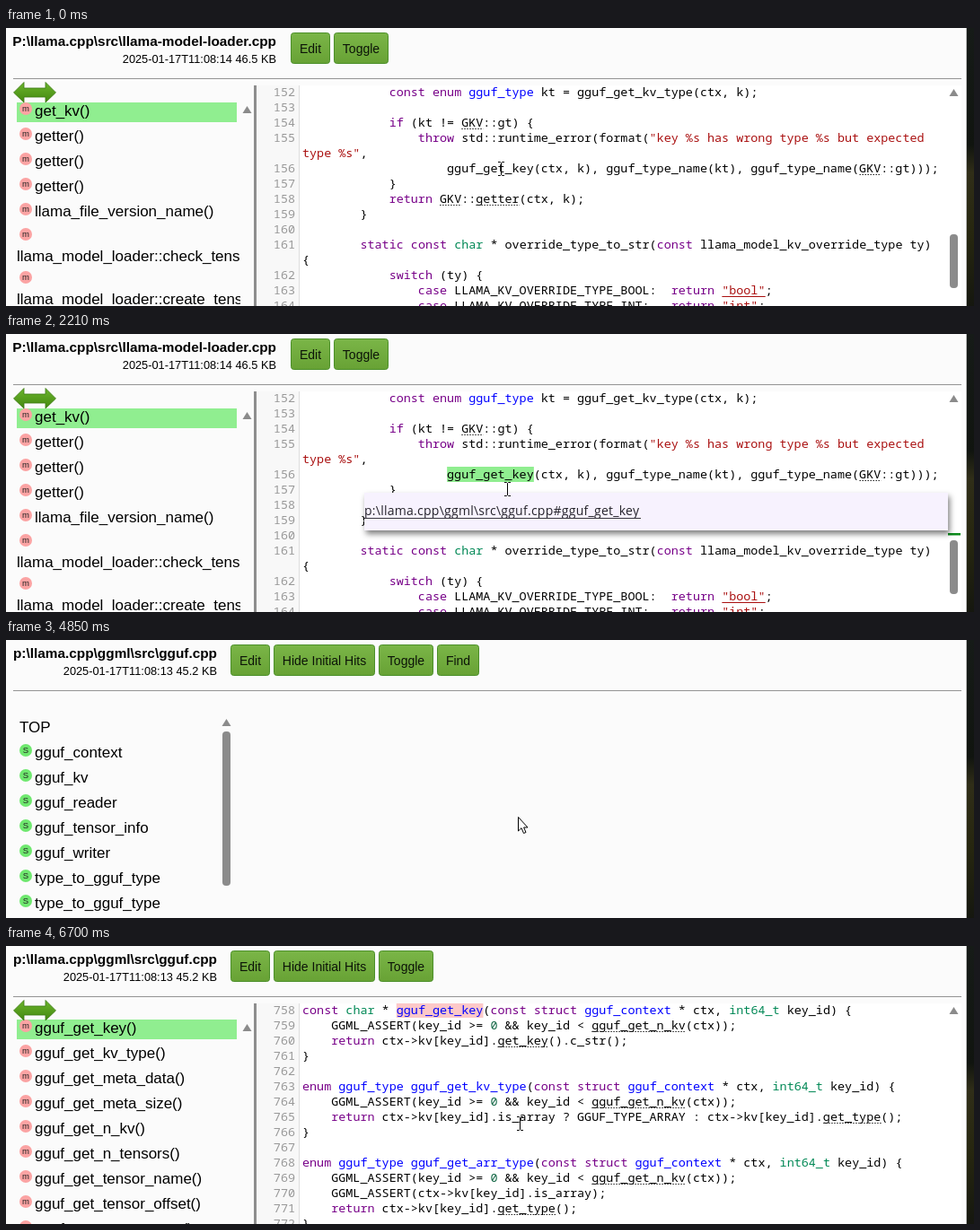
An HTML page that plays this animation: 1078x310 px, repeating every 8 s.

```html
<!DOCTYPE html>
<html lang="en">
<head>
<meta charset="utf-8">
<title>Source browser</title>
<style>
  html, body { margin: 0; width: 100%; height: 100%; overflow: hidden; background: #fbfbfb; }
  svg { display: block; }
  text { white-space: pre; font-family: "Liberation Sans", Arial, sans-serif; }
  .title { font-size: 15.36px; font-weight: bold; text-anchor: end; }
  .date { font-size: 12.8px; text-anchor: end; }
  .button { font-size: 14px; text-anchor: middle; fill: #0c1408; }
  .item { font-size: 17px; }
  .badge { font-size: 9.5px; text-anchor: middle; fill: #222; }
  .code, .num { font-family: "Noto Sans Mono", "DejaVu Sans Mono", monospace; font-size: 13.43px; }
  .num { fill: #999; text-anchor: end; }
  .link { font-family: "Open Sans", "Noto Sans", sans-serif; font-size: 14px; letter-spacing: .25px; fill: #26242c; }
</style>
</head>
<body>
<svg id="stage" width="1078" height="310" viewBox="0 0 1078 310">
  <defs>
    <linearGradient id="green" x2="0" y2="1">
      <stop stop-color="#7ab547"/><stop offset="1" stop-color="#68a235"/>
    </linearGradient>
    <linearGradient id="arrowFill" x2="0" y2="1">
      <stop stop-color="#6cb52d"/><stop offset="1" stop-color="#43880f"/>
    </linearGradient>
    <linearGradient id="desk" x2="0" y2="1">
      <stop stop-color="#161b18"/><stop offset=".42" stop-color="#10140f"/>
      <stop offset=".52" stop-color="#302e18"/><stop offset=".75" stop-color="#26260f"/>
      <stop offset="1" stop-color="#15170f"/>
    </linearGradient>
    <filter id="shadow" x="-5%" y="-40%" width="110%" height="200%">
      <feDropShadow dx="2" dy="4" stdDeviation="3.2" flood-opacity=".5"/>
    </filter>
    <clipPath id="sideClip"><rect y="60" width="261" height="250"/></clipPath>
    <clipPath id="codeClip"><rect x="279" y="64" width="785" height="246"/></clipPath>
    <g id="beam" fill="none" stroke="#000">
      <path d="M-3-7.5h2.5L.5-6.5V6.5L-.5 7.5H-3M4-7.5H1.5L.5-6.5M.5 6.5L1.5 7.5H4"/>
    </g>
    <path id="hand" fill="#fff" stroke="#000" stroke-linejoin="round"
      d="M-1.5 13V1.5Q0-1 1.5 1.5V7.5Q3.5 6 4.5 8.5Q6.5 7 7 9.5Q9 9 9 11.5V16L7 19.5V22H-2.5V20L-7 13.5Q-7 10.5-4 12L-1.5 14Z"/>
    <path id="arrow" fill="#fff" stroke="#000" d="M.5.5V16L4 12.7L6.5 18.5L9 17.5L6.6 12H11Z"/>
    <g id="pencil" transform="rotate(-38)">
      <path fill="#f5c77e" d="M0 0L4-2.5V2.5Z"/><path fill="#444" d="M0 0L1.6-1V1Z"/>
      <path fill="#fbc53a" d="M4-2.5H14V2.5H4Z"/><path fill="#e8962e" d="M4 .8H14V2.5H4Z"/>
      <path fill="#c9c9c9" d="M14-2.5h1.5v5H14Z"/><path fill="#ee6c86" d="M15.5-2.5h1.5q1 2.5 0 5h-1.5Z"/>
    </g>
  </defs>
</svg>
<script>
const LOOP = 8000, LEFT = 330, CHAR = 8.058, ROW = 17;
const stage = document.getElementById('stage');
const layers = [];

function layer(from, to, markup, attrs = '') {
  stage.insertAdjacentHTML('beforeend', `<g ${attrs}>${markup}</g>`);
  const node = stage.lastElementChild;
  layers.push({ from, to, node });
  return node;
}

const esc = s => s.replace(/&/g, '&amp;').replace(/</g, '&lt;').replace(/>/g, '&gt;');
const rect = (x, y, w, h, fill, more = '') =>
  `<rect x="${x}" y="${y}" width="${w}" height="${h}" fill="${fill}" ${more}/>`;
const text = (cls, x, y, s) => `<text class="${cls}" x="${x}" y="${y}">${s}</text>`;

const header = (right, title, date) => text('title', right, 20, title) + text('date', right, 39, date);
const button = (x, w, label) =>
  rect(x + .5, 5.5, w - 1, 34, 'url(#green)', 'rx="3" stroke="#4b8f29"') + text('button', x + w / 2, 28, label);
const badge = (y, letter) =>
  `<circle cx="22" cy="${y}" r="7" fill="${letter === 'm' ? '#fba3a3' : '#6fe86f'}"/>` + text('badge', 22, y + 2.8, letter);
const item = (y, letter, s) => badge(y - 8, letter) + text('item', 32, y, s);
const items = (y, letter, names) => names.map((s, i) => item(y + 28 * i, letter, s)).join('');
const upArrow = (x, y) => `<path fill="#8b8b8b" d="M${x - 5} ${y + 4}L${x} ${y - 4}L${x + 5} ${y + 4}Z"/>`;
const thumb = (x, y, h) => rect(x, y, 9, h, '#8b8b8b', 'rx="4"');

// Syntax colours, in the order of the groups in TOKENS
const COLORS = ['#555', '#a11', '#708', '#085', '#164', '#00f'];
const TOKENS = /(^#.*)|(^type %s"|"[^"]*(?:"|$))|\b(const|enum|if|throw|return|static|switch|case|struct)\b|\b(char|int64_t)\b|(\b0\b)|((?<=enum |struct |^const char \* |gguf_type )gguf_\w+)/g;
const paint = s => esc(s).replace(TOKENS, (m, ...groups) =>
  `<tspan fill="${COLORS[groups.findIndex(Boolean)]}">${m}</tspan>`);

// A line that starts with "~" continues the one before and has no number
function code(lines, num, y) {
  return lines.map((line, i) => {
    const wrapped = line[0] === '~', base = y + i * ROW;
    return (wrapped ? '' : text('num', 322, base, num++)) +
      text('code', LEFT, base, paint(wrapped ? line.slice(1) : line));
  }).join('');
}

function underline(lines, y, pattern, attrs) {
  return lines.map((line, i) => [...line.matchAll(pattern)].map(m => {
    const x = LEFT + m.index * CHAR, base = y + i * ROW + 2.5;
    return `<path d="M${x} ${base}h${m[0].length * CHAR}" ${attrs}/>`;
  }).join('')).join('');
}
const DOTTED = 'stroke="#222" stroke-width="1.2" stroke-dasharray="1.5 1.5"';
const NAMES = /GKV|(?<=::)getter|gguf_get_n_kv|(?<=\.)get_\w+/g;

const mark = (col, len, base, fill) => rect(LEFT + col * CHAR, base - 13, len * CHAR, ROW, fill);
const editor = rect(279, 64, 785, 246, '#fff') + rect(279, 64, 47, 246, '#f8f8f8') +
  rect(326, 64, 1, 246, '#ddd') + rect(276, 64, 3, 246, '#8e8e8e') + upArrow(1055.5, 72);
const splitArrow = `<path fill="url(#arrowFill)" stroke="#3c7a14" stroke-width=".8"
  d="M8.5 72L20 60.5V67H44V60.5L55.5 72L44 83V77H20V83Z"/>`;
const inSide = 'clip-path="url(#sideClip)"', inCode = 'clip-path="url(#codeClip)"';

const loader = [
  '            const enum gguf_type kt = gguf_get_kv_type(ctx, k);',
  '',
  '            if (kt != GKV::gt) {',
  '                throw std::runtime_error(format("key %s has wrong type %s but expected',
  '~type %s",',
  '                    gguf_get_key(ctx, k), gguf_type_name(kt), gguf_type_name(GKV::gt)));',
  '            }',
  '            return GKV::getter(ctx, k);',
  '        }',
  '',
  '        static const char * override_type_to_str(const llama_model_kv_override_type ty)',
  '~{',
  '            switch (ty) {',
  '                case LLAMA_KV_OVERRIDE_TYPE_BOOL:  return "bool";',
  '                case LLAMA_KV_OVERRIDE_TYPE_INT:   return "int";'
];
const includes = [
  ...['ggml', 'ggml-backend', 'ggml-impl', 'gguf'].map(s => `#include "${s}.h"`), '',
  ...'cinttypes cstddef cstdint cstdio cstdlib cstring map new stdexcept'.split(' ').map(s => `#include <${s}>`)
];
const check = '    GGML_ASSERT(key_id >= 0 && key_id < gguf_get_n_kv(ctx));';
const args = '(const struct gguf_context * ctx, int64_t key_id) {';
const getters = [
  'const char * gguf_get_key' + args,
  check,
  '    return ctx->kv[key_id].get_key().c_str();',
  '}', '',
  'enum gguf_type gguf_get_kv_type' + args,
  check,
  '    return ctx->kv[key_id].is_array ? GGUF_TYPE_ARRAY : ctx->kv[key_id].get_type();',
  '}', '',
  'enum gguf_type gguf_get_arr_type' + args,
  check,
  '    GGML_ASSERT(ctx->kv[key_id].is_array);',
  '    return ctx->kv[key_id].get_type();',
  '}'
];

// Window
layer(0, LOOP, rect(0, 0, 1070, 310, '#fbfbfb') + rect(1069, 0, 1, 310, '#b5b5b5') +
  rect(1070, 0, 8, 310, 'url(#desk)') + rect(8, 56, 1056, 1, '#949494'));

// First file
layer(0, 4850, header(301, 'P:\\llama.cpp\\src\\llama-model-loader.cpp', '2025-01-17T11:08:14 46.5 KB') +
  button(317, 44, 'Edit') + button(365, 61, 'Toggle') + editor + upArrow(268.5, 91) + thumb(1051, 230, 60));
layer(0, 4850, rect(12, 83, 245, 22, '#90ee90') +
  items(98, 'm', ['get_kv()', 'getter()', 'getter()', 'getter()', 'llama_file_version_name()']) +
  badge(230, 'm') + text('item', 12, 260, 'llama_model_loader::check_tensor_dims()') +
  badge(278, 'm') + text('item', 12, 308, 'llama_model_loader::create_tensor()'), inSide);
layer(580, 4850, mark(20, 12, 161, '#90ee90') + rect(1049, 222, 14, 2.5, '#0a8a1a'));
layer(0, 4850, code(loader, 152, 76) + underline(loader, 76, NAMES, DOTTED) +
  underline(loader, 76, /"(bool|int)"/g, 'stroke="#a11"'), inCode);
const popup = layer(1160, 4850, rect(399, 177, 650, 42, '#f7f2fe', 'filter="url(#shadow)"') +
  text('link', 399, 202, 'p:\\llama.cpp\\ggml\\src\\gguf.cpp#gguf_get_key') + rect(399, 205, 308, 1, '#3a3840'));

// Second file
layer(4850, LOOP, header(235, 'p:\\llama.cpp\\ggml\\src\\gguf.cpp', '2025-01-17T11:08:13 45.2 KB') +
  button(250, 44, 'Edit') + button(298, 113, 'Hide Initial Hits') + button(415, 61, 'Toggle'));
layer(4850, 5000, button(480, 47, 'Find'));
layer(4850, 5900, text('item', 15, 103, 'TOP') + items(131, 'S', ['gguf_context', 'gguf_kv', 'gguf_reader',
  'gguf_tensor_info', 'gguf_writer', 'type_to_gguf_type', 'type_to_gguf_type']), inSide);
layer(4850, 5310, upArrow(245.5, 92) + thumb(241, 102, 172));
layer(5310, LOOP, editor);
layer(5310, 5900, upArrow(268.5, 92) + thumb(264, 102, 230) + thumb(1051, 83, 54) + code(includes, 1, 81));
layer(5460, 5900, underline(includes, 81, /".*"/g, 'stroke="#555"') +
  includes.slice(0, 4).map((s, i) =>
    `<use href="#pencil" x="0" transform="translate(${LEFT + s.length * CHAR + 6} ${81 + i * ROW})"/>`).join(''));

// Jump to the function
layer(5900, LOOP, upArrow(268.5, 91) + rect(12, 82, 245, 22, '#90ee90') + items(97, 'm',
  ['key', 'kv_type', 'meta_data', 'meta_size', 'n_kv', 'n_tensors', 'tensor_name', 'tensor_offset', 'tensor_type']
    .map(s => `gguf_get_${s}()`)));
layer(6700, LOOP, mark(13, 12, 76, '#fcc8c8'), inCode);
layer(5900, LOOP, code(getters, 758, 76), inCode);
layer(6300, LOOP, underline(getters, 76, NAMES, DOTTED), inCode);

layers.push({ from: 0, to: 4850, node: null }, { from: 5000, to: LOOP, node: null });
for (const l of layers.slice(-2)) l.node = layer(l.from, l.to, splitArrow);

// Pointer: time, shape, x, y
const PATH = [
  [0, 'beam', 551, 157], [2060, 'beam', 554, 161], [2210, 'beam', 558, 173],
  [2360, 'hand', 565, 185], [2480, 'hand', 569, 191], [2600, 'hand', 572, 196],
  [2870, 'hand', 573, 198], [4460, 'arrow', 570, 197], [5310, 'beam', 572, 198]
];
stage.insertAdjacentHTML('beforeend', '<use/>');
const pointer = stage.lastElementChild;

function draw(now) {
  const t = now % LOOP;
  for (const { from, to, node } of layers) node.style.display = t >= from && t < to ? '' : 'none';
  popup.style.opacity = t < 1280 ? .88 : 1;
  const [, shape, x, y] = PATH.findLast(p => p[0] <= t);
  pointer.setAttribute('href', '#' + shape);
  pointer.setAttribute('x', x);
  pointer.setAttribute('y', y);
}

const start = performance.now();
function tick() {
  draw(performance.now() - start);
  requestAnimationFrame(tick);
}
draw(0);
requestAnimationFrame(tick);
</script>
</body>
</html>
```
